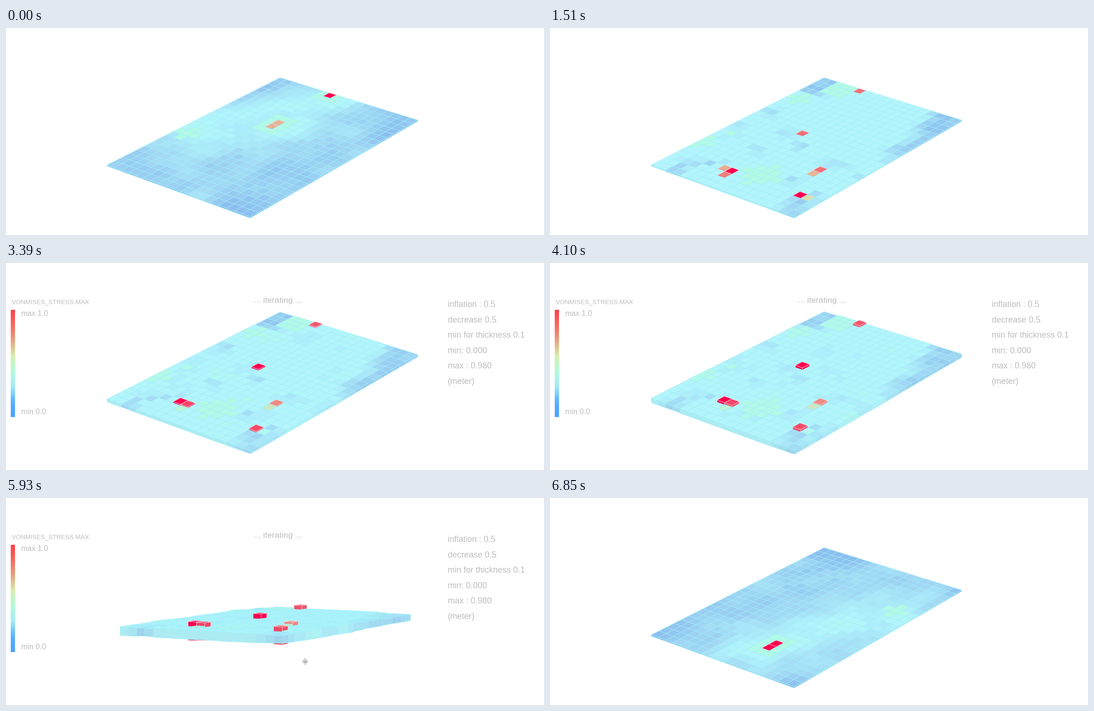
Write a matplotlib script that moves like this. It is 1135 px wide and 438 px high and loops after 6.95 s.

```python
import numpy as np
import matplotlib.pyplot as plt
from matplotlib.animation import FuncAnimation
from matplotlib.collections import PolyCollection
from matplotlib.colors import LinearSegmentedColormap
from matplotlib.patches import Ellipse

W, H, DPI = 1135, 438, 100
LOOP, TICK = 6950, 50
ROWS, COLS = 25, 19
LONG, SHORT, DIST = 580, 376.6, 4120

# moments in ms: the picture only changes on these steps
STEPS = np.linspace(880, 6850, 68)
T_MAX, T_TEXT, T_GROW, T_TILT, T_END = 1500, 1590, 2400, 5310, 6750
TILT_MS = 550

# azimuth, elevation (degrees), centre of the slab on screen
HOME = np.array([38.2, 25.15, 549.2, 242.4])
LOW = np.array([29.2, 5.1, 559, 266.5])

STRESS = LinearSegmentedColormap.from_list("stress", [
    "#8cbeee", "#a3d9f4", "#b3f5fc", "#b2fbe0",
    "#dadeb0", "#e6b294", "#f07c7c", "#ff0050"])
LEGEND = LinearSegmentedColormap.from_list("legend", [
    "#ff424a", "#f56e5f", "#e8a582", "#d6f0ac",
    "#b0fcd8", "#a3eefa", "#5cb4ff", "#4aa4ff"])
CYAN, MINT = .29, .43

RR, CC = np.mgrid[0:ROWS, 0:COLS].astype(float)
U, V = (CC + .5) / COLS, (RR + .5) / ROWS


def project(r, c, z, view):
    """Grid position and height to pixels."""
    az, el = np.radians(view[:2])
    u = (c / COLS - .5) * SHORT
    v = (r / ROWS - .5) * LONG
    a = u * np.cos(az) - v * np.sin(az)
    b = u * np.sin(az) + v * np.cos(az)
    scale = DIST / (DIST - b * np.cos(el) - z * np.sin(el))
    up = z * np.cos(el) - b * np.sin(el)
    return np.stack([view[2] + a * scale, view[3] - up * scale], -1)


def patchy(seed, passes=2):
    """Smooth random field with unit spread."""
    n = np.random.default_rng(seed).normal(size=(ROWS, COLS))
    for _ in range(passes):
        p = np.pad(n, 1, mode="edge")
        n = n + p[:-2, 1:-1] + p[2:, 1:-1] + p[1:-1, :-2] + p[1:-1, 2:]
    return (n - n.mean()) / n.std()


def near(r, c):
    return np.hypot(RR - r, CC - c)


def near_line(a, b):
    (r0, c0), (dr, dc) = a, np.subtract(b, a)
    s = ((RR - r0) * dr + (CC - c0) * dc) / (dr * dr + dc * dc)
    s = np.clip(s, 0, 1)
    return near(r0 + s * dr, c0 + s * dc)


CORNERS = ((2 * U - 1) * (2 * V - 1)) ** 2


def load_case(seed, path, hot):
    """Stress of one load: warm along a path, peaks in the hot cells."""
    d = near_line(*path)
    for r, c, _ in hot:
        d = np.minimum(d, near(r, c))
    f = .11 + .19 * np.exp(-(d / 5) ** 2) + .03 * patchy(seed) - .1 * CORNERS
    f = np.clip(f, 0, .32)
    for end in path:
        f[near(*end) < 1.2] = .4
    for r, c, _ in hot:
        f[near(r, c) < 1.5] = MINT - .03
    for r, c, level in hot:
        f[r, c] = level
    return f


# row, column, level before and after the growth
HOT = [(0, 5, .87, .9), (11, 7, .87, 1), (21, 7, 1, .92), (21, 6, .73, 1),
       (22, 7, .85, .45), (16, 14, .87, .82), (17, 14, .7, .52),
       (21, 16, 1, .91), (21, 17, .57, .33)]
GREEN = [(1, 3, 1.8), (5, 1, 1.2), (20, 10, 2.2), (15, 1, .8), (18, 0, 1)]

FIRST = load_case(3, [(0, 7), (15, 1)], [(0, 7, 1), (8, 7, .71), (9, 7, .71)])
LAST = load_case(8, [(19, 11), (7, 16)], [(19, 11, 1), (20, 11, 1)])


def passing_case(k):
    (r, c), (r2, c2) = (HOT[(k * m + 1) % len(HOT)][:2] for m in (4, 7))
    path = [(r, c), (r2 - 3, c2 + .5)]
    return load_case(60 + k, path, [(r, c, 1), (r2, c2, .73)])


PASSING = [passing_case(k) for k in range(8)]

COOL = np.clip(.11 * patchy(12) + .22 * CORNERS + .07 * U ** 4 - .1, 0, .25)


def max_field(t, step):
    """Envelope of all load cases at the given time."""
    k = np.clip((t - T_GROW) / 2480, 0, 1)
    f = CYAN - COOL * (1 - .35 * k)
    if t > T_GROW:
        f += .012 * patchy(100 + step, 1)
    f = np.round(f * 24) / 24
    for r, c, size in GREEN:
        f[near(r, c) <= size] = MINT - .03 - .03 * k
    f = np.clip(f, .01, MINT)
    for r, c, before, after in HOT:
        f[r, c] = before + (after - before) * min(1, 2.5 * k)
    return f


# pixels of half thickness gained per second
GROWTH = 1 + 4.1 * max_field(4880, 45)


def field(t, step):
    if step < 0:
        return FIRST
    if t < T_MAX:
        return PASSING[step]
    if t < T_END:
        return max_field(t, step)
    return LAST if step == len(STEPS) - 1 else PASSING[7]


def tilt(t):
    s = np.clip((t - T_TILT) / TILT_MS, 0, 1)
    return s * s * (3 - 2 * s)


def camera(t):
    if t >= T_END:
        return HOME
    drift = np.clip((t - T_TILT - TILT_MS) / 800, 0, 1)
    return HOME + (LOW - HOME) * tilt(t) - drift * np.array([3, 1.5, 0, 0])


def boxes(h, view):
    """Left, right and top face of every cell, back to front."""
    def p(dr, dc, side):
        return project(RR + dr, CC + dc, side * h, view)
    left = [p(1, 0, 1), p(1, 1, 1), p(1, 1, -1), p(1, 0, -1)]
    right = [p(0, 1, 1), p(1, 1, 1), p(1, 1, -1), p(0, 1, -1)]
    top = [p(0, 0, 1), p(0, 1, 1), p(1, 1, 1), p(1, 0, 1)]
    faces = [np.stack(q, 2) for q in (left, right, top)]
    return np.stack(faces, 2).reshape(-1, 4, 2)


def paint(v):
    top = STRESS(v)[..., :3]
    fills = np.stack([top * .96, top * .98, top], 2).reshape(-1, 3)
    edges = np.where(v[..., None] > .65, (1, .84, .85), (.63, .94, .985))
    return fills, np.repeat(edges.reshape(-1, 3), 3, axis=0)


fig = plt.figure(figsize=(W / DPI, H / DPI), dpi=DPI, facecolor="white")
ax = fig.add_axes([0, 0, 1, 1])
ax.axis("off")

slab = PolyCollection(np.zeros((1, 4, 2)), linewidths=.5, joinstyle="round")
ax.add_collection(slab)

bar = ax.imshow(np.linspace(0, 1, 40)[:, None], cmap=LEGEND,
                extent=(10, 19, 326, 99), aspect="auto",
                interpolation="nearest")
ax.set_xlim(0, W)
ax.set_ylim(H, 0)


def label(x, y, text, px):
    return ax.text(x, y, text, fontsize=px * 72 / DPI, color="#bdbdbd",
                   family="Liberation Sans", va="baseline")


title = label(12, 86, "", 13.3)
overlay = [bar, title, label(32, 112, "max 1.0", 16),
           label(32, 319.5, "min 0.0", 16),
           label(523, 84, "... iterating ...", 17.5)]
NOTES = ["inflation : 0.5", "decrease 0.5", "min for thickness 0.1",
         "min: 0.000", "max : 0.980", "(meter)"]
overlay += [label(932, 93 + 32.6 * i, s, 17.8) for i, s in enumerate(NOTES)]

# orbit pointer
rings = [ax.add_patch(Ellipse((0, 0), w, h, fill=False, ec="#999999",
                              lw=.6, zorder=5))
         for w, h in ((12, 5), (5, 13))]
cross, = ax.plot([], [], "+", ms=4, mew=.6, color="#777777", zorder=5)


def move_pointer(t):
    x, y = 590 + 41 * tilt(t), 398 - 52 * tilt(t)
    for ring in rings:
        ring.center = x, y
    cross.set_data([x], [y])
    for part in (*rings, cross):
        part.set_visible(T_TILT < t < T_END)


def draw(n):
    step = int(np.searchsorted(STEPS, n * TICK + 40, side="right")) - 1
    t = STEPS[step] if step >= 0 else 0
    growing = T_GROW < t < T_END
    h = 1.5 + GROWTH * growing * (t - T_GROW) / 1000
    slab.set_verts(boxes(h, camera(t)))
    fills, edges = paint(field(t, step))
    slab.set_facecolor(fills)
    slab.set_edgecolor(edges)
    for item in overlay:
        item.set_visible(T_TEXT <= t < T_END)
    gap = "  " if step % 2 else "_"
    title.set_text(f"VONMISES{gap}STRESS MAX")
    move_pointer(t)
    return [slab, *overlay, *rings, cross]


anim = FuncAnimation(fig, draw, frames=LOOP // TICK, interval=TICK,
                     init_func=lambda: draw(0), repeat=True, repeat_delay=0)
plt.show()
```
